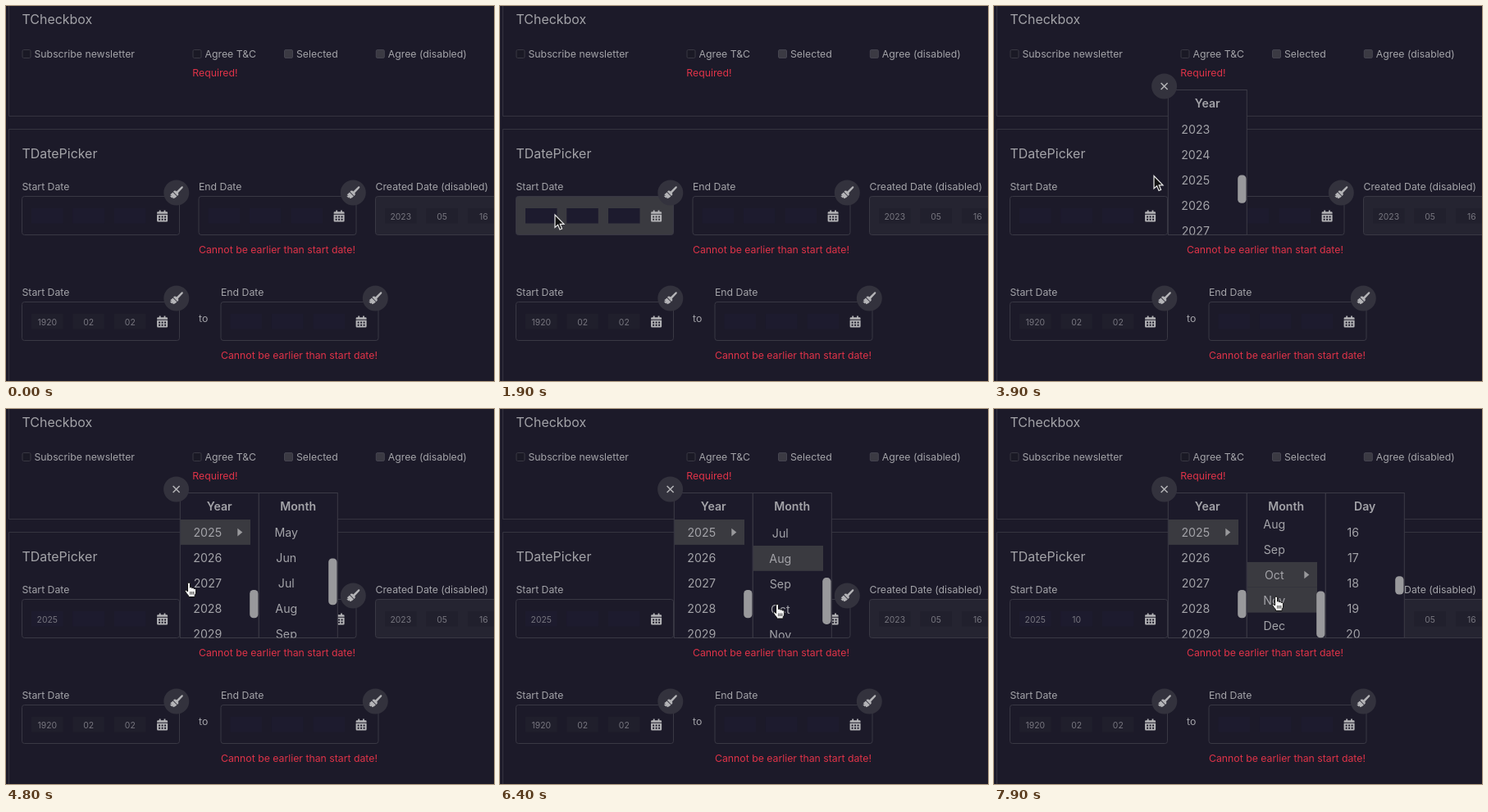
An HTML page for the animation above (8 s loop, 595 by 458 pixels).

```html
<!DOCTYPE html>
<html lang="en">
<head>
<meta charset="utf-8">
<title>Form components</title>
<style>
  html, body { margin: 0; width: 100%; height: 100%; overflow: hidden; background: #1c1a29; }
  svg { display: block; }
  text { font-family: Inter, "Open Sans", sans-serif; font-size: 12.28px; fill: #a3a3a8; }
  .title { font-size: 15.95px; }
  .error { fill: #de3348; }
  .value { font-size: 10.4px; fill: #77767f; text-anchor: middle; }
  .head { font-size: 14.1px; font-weight: 600; text-anchor: middle; }
  .item { font-size: 14.2px; text-anchor: middle; }
  .line { fill: none; stroke: #353440; }
  .icon { fill: #b4b4b7; }
  .badge { fill: #33323d; }
  .thumb { fill: #99999c; }
  .lit { fill: #3a3a40; }
</style>
</head>
<body>
<svg id="stage" width="595" height="458" viewBox="0 0 595 458"></svg>
<script>
const LOOP = 8000, STEP = 100;
const ROW = 30.85, LIST_TOP = 135, LIST_H = 144.5, THUMB_TOP = 134.3;
const OPEN = 2400, PICK_YEAR = 4500, PICK_MONTH = 7200;
const stage = document.getElementById('stage');

const text = (x, y, str, cls = '', id = '') =>
  `<text x="${x}" y="${y}" class="${cls}" id="${id}">${str}</text>`;
const rect = (x, y, w, h, attrs = '') =>
  `<rect x="${x}" y="${y}" width="${w}" height="${h}" ${attrs}/>`;

function checkbox(x, label, disabled) {
  const look = disabled ? 'fill="#3b3a43" stroke="#454450"' : 'fill="#1a1925" stroke="#393843"';
  return rect(x + .5, 53.5, 10, 10, `rx="1.5" ${look}`) + text(x + 15, 63, label);
}

const CALENDAR = 'M0 4.3V3Q0 1.8 1.2 1.8H2.7V0H4.5V1.8H8.5V0H10.3V1.8H11.8Q13 1.8 13 3V4.3Z' +
  'M0 5.3H13V12.8Q13 14 11.8 14H1.2Q0 14 0 12.8Z' +
  [2, 5.5, 9].map(x => [7, 10.3].map(y => `M${x} ${y}h2v2h-2z`).join('')).join('');
const BRUSH = 'M7.8-7.4Q8.4-6.6 7.7-5.8L1.9.4.1-1.5 6.2-7.4Q7.1-8.1 7.8-7.4Z' +
  'M-2.6-2.4-.6-2.2 2.4.9 2.4 2.8 1.2 4-3.8-1.2Z' +
  'M-4.4-.6.6 4.6Q-1.4 7-4 7.2L-4.6 5.6-5.6 6.4-8 4 -5.8 3.4-7.6 2.2Q-5.8 1-4.4-.6Z';
const ARROW = 'M0 0V15.5L3.6 12.2 6 18 8.6 16.9 6.2 11.3H11Z';
const HAND = 'M-1.5 1.2Q-1.5 0 0 0T1.5 1.2V6.2Q1.7 5.4 2.7 5.6 3.8 5.8 3.8 6.8 4.4 6 5.4 6.4 ' +
  '6.2 6.8 6.2 7.6 7 7 7.9 7.5 8.6 8 8.6 9V12Q8.6 14 7.2 15.4V17.5H-.6V16Q-3 13.5-4.6 10.4-4.4 9-3.2 9.3L-1.5 11Z';

const fields = [
  { x: 19.5, y: 232.5, label: 'Start Date', values: ['', '', ''] },
  { x: 235, y: 232.5, label: 'End Date', values: ['', '', ''], error: true },
  { x: 450.5, y: 232.5, label: 'Created Date (disabled)', values: ['2023', '05', '16'], disabled: true },
  { x: 19.5, y: 361.5, label: 'Start Date', values: ['1920', '02', '02'] },
  { x: 262, y: 361.5, label: 'End Date', values: ['', '', ''], error: true }
];

function field({ x, y, label, values, error, disabled }, i) {
  const parts = values.map((v, n) => {
    const left = x + [11.5, 61.8, 112.5][n];
    const fill = disabled ? '#21202d' : v ? '#201f2c' : '#1d1b2e';
    return rect(left, y + 14.5, 38.5, 18.5, `fill="${fill}"`) +
      text(left + 19.3, y + 28, v, 'value', `v${i}${n}`);
  }).join('');
  return text(x, y - 8, label) +
    rect(x, y, 192, 47, `id="box${i}" rx="3" stroke="#393844" fill="${disabled ? '#252431' : 'none'}"`) +
    parts +
    (disabled ? '' :
      `<path class="icon" fill-rule="evenodd" d="${CALENDAR}" transform="translate(${x + 164.6} ${y + 17})"/>` +
      `<g id="brush${i}" transform="translate(${x + 188.3} ${y - 4.5})"><circle class="badge" r="15.5"/>` +
      `<path class="icon" d="${BRUSH}"/></g>`) +
    (error ? text(x, y + 69, 'Cannot be earlier than start date!', 'error') : '');
}

const range = (from, n) => Array.from({ length: n }, (_, i) => String(from + i));
const columns = [
  { id: 'year', x: 212, head: 'Year', items: range(2013, 20) },
  { id: 'month', x: 308, head: 'Month', items: 'Jan Feb Mar Apr May Jun Jul Aug Sep Oct Nov Dec'.split(' ') },
  { id: 'day', x: 404, head: 'Day', items: range(1, 31) }
];

function column({ id, x, head, items }) {
  const rows = items.map((s, i) => text(33.8, i * ROW + 21.2, s, 'item')).join('');
  const thumb = LIST_H * LIST_H / (items.length * ROW) + .4;
  return `<g id="${id}">` +
    rect(x + .3, 102.5, 96, 177, 'fill="#1c1a2a" stroke="#3c3b47"') +
    text(x + 48.2, 124.2, head, 'head') +
    `<svg x="${x}" y="${LIST_TOP}" width="96" height="${LIST_H}" overflow="hidden"><g id="${id}-list">` +
    rect(1, 0, 85, ROW, `class="lit" id="${id}-hover"`) +
    `<g id="${id}-pick">${rect(1, 0, 85, ROW, 'class="lit"')}` +
    `<path class="thumb" d="M70.3 10.8 76.3 15.6 70.3 20.4Z"/></g>${rows}</g></svg>` +
    rect(x + 85.2, THUMB_TOP, 10.3, thumb, `rx="4.5" class="thumb" id="${id}-thumb"`) + '</g>';
}

stage.innerHTML =
  rect(0, 0, 595, 458, 'fill="#1c1a29"') +
  '<path class="line" d="M3.5 0V134.5H595M595 150.5H3.5V458"/>' +
  text(19.5, 22, 'TCheckbox', 'title') +
  checkbox(19.5, 'Subscribe newsletter') + checkbox(227.5, 'Agree T&amp;C') +
  checkbox(339, 'Selected', true) + checkbox(450.8, 'Agree (disabled)', true) +
  text(227.3, 86, 'Required!', 'error') +
  text(19.5, 186, 'TDatePicker', 'title') +
  fields.map(field).join('') +
  text(235, 386, 'to') +
  `<g id="popup">${columns.map(column).join('')}
   <g transform="translate(207.6 98)"><circle class="badge" r="15.5"/>
   <path d="M-4-4 4 4M4-4-4 4" stroke="#b4b4b7" stroke-width="1.5"/></g></g>
   <g id="cursor"><path id="arrow" d="${ARROW}" fill="#111" stroke="#e8e8e8" stroke-width="1.2"/>
   <path id="hand" d="${HAND}" fill="#f2f2f2" stroke="#111"/>
   <path id="knuckles" d="M1.8 11v3.6M3.8 11v3.6M5.8 11v3.6" stroke="#111" stroke-width=".8"/></g>`;

const $ = id => document.getElementById(id);
const show = (id, on) => $(id).setAttribute('visibility', on ? 'inherit' : 'hidden');
const move = (id, x, y) => $(id).setAttribute('transform', `translate(${x} ${y})`);
const between = (t, a, b) => t >= a && t < b;

// Eased value between keys of the form [time, value, ...]
function track(keys, t) {
  const n = keys.findIndex(k => k[0] > t);
  if (n === 0) return keys[0].slice(1);
  if (n < 0) return keys[keys.length - 1].slice(1);
  const a = keys[n - 1], b = keys[n];
  const p = (t - a[0]) / (b[0] - a[0]), e = p * p * (3 - 2 * p);
  return a.slice(1).map((v, i) => v + (b[i + 1] - v) * e);
}

const cursorKeys = [
  [800, 592, 455], [1600, 72, 262], [1800, 72, 262], [1900, 67, 255], [2300, 68, 269],
  [3000, 68, 269], [3900, 195, 207.5], [4400, 223, 212], [4900, 223, 212],
  [5700, 338, 238.5], [7200, 338, 238.5], [7700, 344, 229]
];
const monthKeys = [[5900, 4 * ROW], [6400, 184]];

function setColumn({ id, items }, scroll, hover, pick) {
  const total = items.length * ROW;
  const y = Math.min(scroll, total - LIST_H);
  move(id + '-list', 0, -y);
  $(id + '-thumb').setAttribute('y', THUMB_TOP + y * LIST_H / total);
  show(id + '-hover', hover >= 0);
  move(id + '-hover', 0, hover * ROW);
  show(id + '-pick', pick >= 0);
  move(id + '-pick', 0, pick * ROW);
}

function update(t) {
  const [x, y] = track(cursorKeys, t);
  const open = t >= OPEN, hasYear = t >= PICK_YEAR, hasMonth = t >= PICK_MONTH;
  const visible = t >= 900;

  let onField = false;
  fields.forEach((f, i) => {
    if (f.disabled) return;
    const over = visible && between(x, f.x, f.x + 192) && between(y, f.y, f.y + 47) && !(open && x > 212);
    $('box' + i).setAttribute('fill', over ? '#3a3a40' : 'none');
    onField = onField || over;
  });

  $('v00').textContent = hasYear ? '2025' : '';
  $('v01').textContent = hasMonth ? '10' : '';
  show('brush0', !open);
  show('popup', open);
  show('month', open && hasYear);
  show('day', open && hasMonth);

  const yearHover = between(t, 4200, PICK_YEAR) ? 12 : between(t, 5000, 5400) ? 14 : -1;
  setColumn(columns[0], (hasYear ? 12 : 10) * ROW, yearHover, hasYear ? 12 : -1);
  const monthHover = between(t, 5500, 6600) ? 7 : between(t, 6600, PICK_MONTH) ? 9 : t >= 7500 ? 10 : -1;
  setColumn(columns[1], hasMonth ? 9 * ROW : track(monthKeys, t)[0], monthHover, hasMonth ? 9 : -1);
  setColumn(columns[2], 15 * ROW, -1, -1);

  const hand = t >= 2000 && (onField || (open && x > 212));
  show('cursor', visible);
  move('cursor', x, y);
  show('arrow', visible && !hand);
  show('hand', visible && hand);
  show('knuckles', visible && hand);
}

const start = performance.now();
function tick() {
  const t = (performance.now() - start) % LOOP;
  update(Math.floor(t / STEP) * STEP);
  requestAnimationFrame(tick);
}
tick();
</script>
</body>
</html>
```
